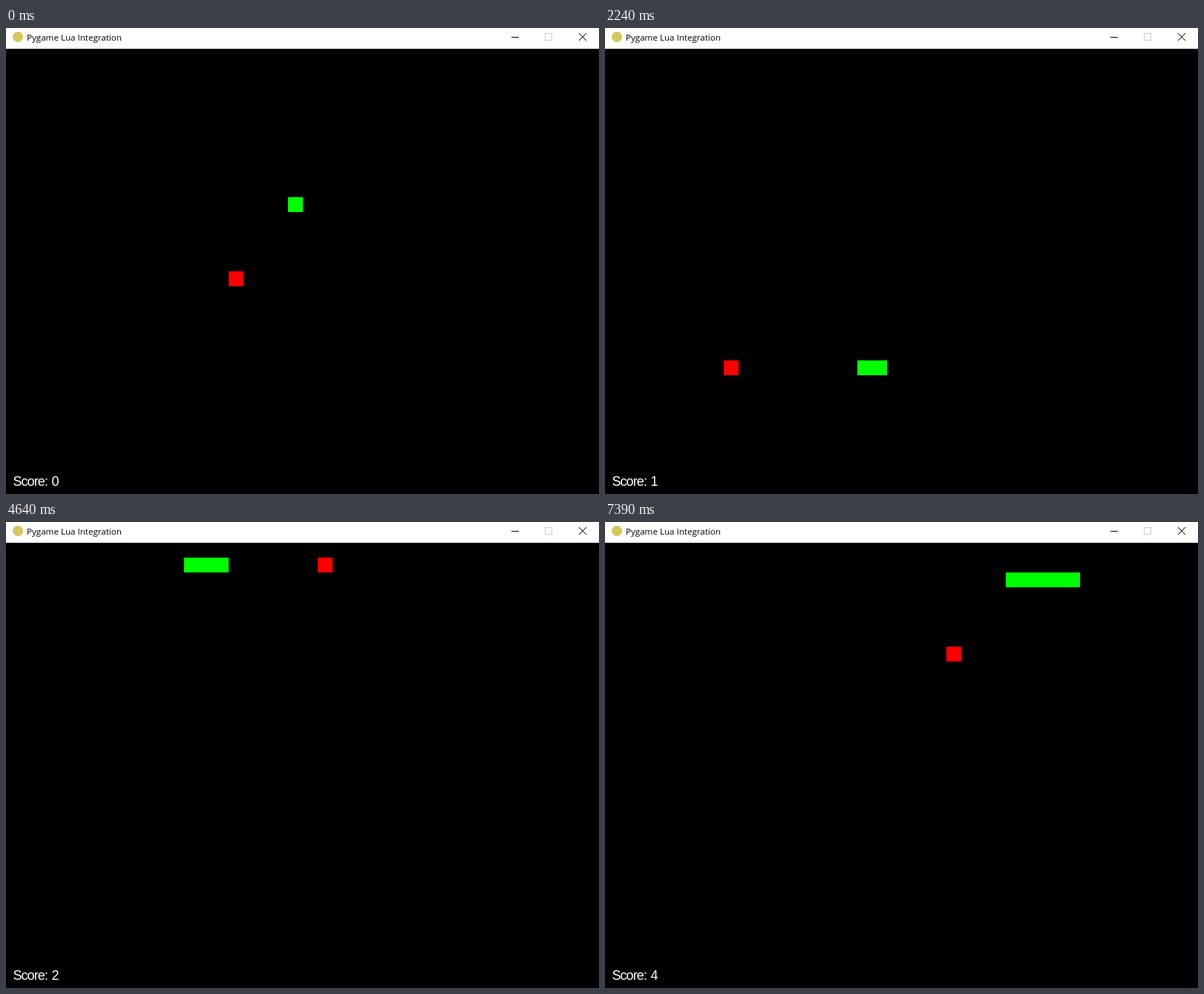
These frames come from a looping animation (799x628 px, 7.41 s). An HTML page with a canvas:

```html
<!DOCTYPE html>
<html lang="en">
<head>
<meta charset="utf-8">
<title>Pygame Lua Integration</title>
<style>
  html, body { margin: 0; width: 100%; height: 100%; overflow: hidden; background: #000; }
  canvas { display: block; }
</style>
</head>
<body>
<canvas id="stage" width="799" height="628"></canvas>
<script>
const ctx = document.getElementById("stage").getContext("2d");
const WIDTH = 799, HEIGHT = 628, BAR = 28, CELL = 20, LOOP = 7410;
const SCORE_FONT = '18px "Liberation Sans", Arial, sans-serif';
const TITLE_FONT = '11.6px "Open Sans", sans-serif';

// The snake's turns: a direction and a number of cells.
const start = [19, 10];
const moves = "D8 L8 U3 R7 D6 L10 U20 R16 D7 R3 U8 R5 D2 L5";
const directions = { U: [0, -1], D: [0, 1], L: [-1, 0], R: [1, 0] };
const foods = [[15, 15], [8, 21], [21, 1], [28, 0], [23, 7]];

const path = [start];
for (const move of moves.split(" ")) {
  const [dx, dy] = directions[move[0]];
  for (let n = Number(move.slice(1)); n > 0; n--) {
    const [x, y] = path[path.length - 1];
    path.push([x + dx, y + dy]);
  }
}

let eaten = 0;
const scores = path.map(([x, y]) => {
  const [fx, fy] = foods[eaten];
  if (x === fx && y === fy) eaten++;
  return eaten;
});

// The screen refreshes about every 132 ms, on a 30 ms grid.
const refreshTime = n => 10 + 30 * Math.floor(4.405 * n + 0.1);

// Each refresh shows two more cells of travel, but every 17th only one.
function headIndex(ms) {
  let n = 0;
  while (refreshTime(n + 1) <= ms) n++;
  return Math.min(2 * n - Math.floor((n + 3) / 17), path.length - 1);
}

function drawCell([x, y], color) {
  ctx.fillStyle = color;
  ctx.fillRect(x * CELL, BAR + y * CELL, CELL, CELL);
}

function drawText(text, x, y, font, color, spacing = 0) {
  ctx.font = font;
  ctx.letterSpacing = spacing + "px";
  ctx.fillStyle = color;
  ctx.fillText(text, x, y);
}

function drawTitleBar() {
  ctx.fillStyle = "#fff";
  ctx.fillRect(0, 0, WIDTH, BAR);
  ctx.fillStyle = "#d6c65c";
  ctx.beginPath();
  ctx.arc(16, 12, 7, 0, Math.PI * 2);
  ctx.fill();
  drawText("Pygame Lua Integration", 28, 17, TITLE_FONT, "#000");

  ctx.fillStyle = "#000";
  ctx.fillRect(681, 12, 10, 1);
  ctx.strokeStyle = "#ccc";
  ctx.strokeRect(726.5, 7.5, 9, 9);
  ctx.strokeStyle = "#000";
  ctx.beginPath();
  ctx.moveTo(772, 7);
  ctx.lineTo(782, 17);
  ctx.moveTo(782, 7);
  ctx.lineTo(772, 17);
  ctx.stroke();
}

function draw(ms) {
  const head = headIndex(ms);
  const score = scores[head];
  ctx.fillStyle = "#000";
  ctx.fillRect(0, 0, WIDTH, HEIGHT);
  drawTitleBar();
  path.slice(head - score, head + 1).forEach(cell => drawCell(cell, "#0f0"));
  drawCell(foods[score], "#f00");
  drawText("Score:", 9.4, 617, SCORE_FONT, "#fff", -0.9);
  drawText(score, 61.4, 617, SCORE_FONT, "#fff");
}

const startTime = performance.now();
function frame() {
  draw((performance.now() - startTime) % LOOP);
  requestAnimationFrame(frame);
}
frame();
</script>
</body>
</html>
```
